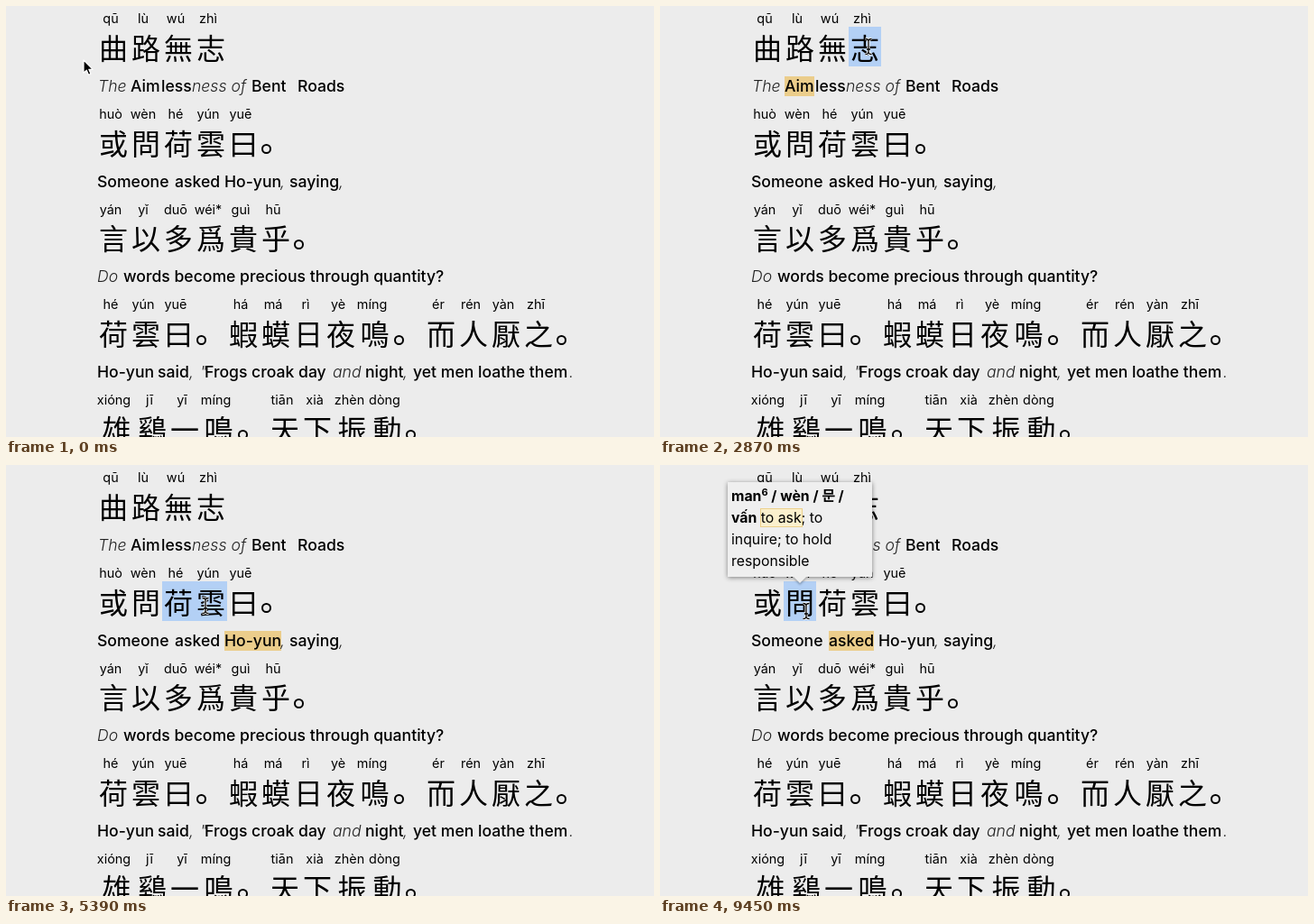
Recreate the animation shown at these times as an HTML page. Size 718 by 478 pixels, loop 9.66 s.

```html
<!DOCTYPE html>
<html lang="zh-Hant">
<head>
<meta charset="utf-8">
<style>
  html, body { margin: 0; width: 100%; height: 100%; overflow: hidden; background: #ececec; }
  body { position: relative; font-family: Inter, sans-serif; color: #000; cursor: default; }
  #page *, #tip, #pointer { position: absolute; white-space: nowrap; }
  .hanzi { height: 44px; font: 32px/44px "Noto Sans CJK TC", "Noto Sans CJK SC", sans-serif; text-align: center; }
  .pinyin { font-size: 14.4px; line-height: 18px; transform: translateX(-50%); }
  .stop { width: 7px; height: 7px; border: 2.6px solid #000; border-radius: 50%; }
  .word { font-size: 17.6px; font-weight: 500; line-height: 22px; }
  .light { font-weight: 300; font-style: italic; color: #222; }
  .hanzi.lit { background: #b3d0f5; }
  .word.lit { background: #ebcd8b; }
  #tip {
    left: 75px; top: 19px; width: 156px; height: 101px; padding: 4px 0 0 4px;
    background: #efefef; box-shadow: 0 1px 5px #0007; font-size: 15.8px; line-height: 24px;
  }
  #tip::after {
    content: ""; position: absolute; left: 73px; top: 105px;
    border: 7px solid transparent; border-top-color: #efefef; border-bottom: 0;
    filter: drop-shadow(0 2px 1px #0004);
  }
  #tip sup { font-size: 11px; line-height: 0; }
  #tip mark { color: inherit; background: #fbf0cd; outline: 1px solid #ecd08a; }
  #pointer { left: 0; top: 0; overflow: visible; }
</style>
</head>
<body>
<div id="page"></div>
<div id="tip"><b>man<sup>6</sup> / wèn / 문 /<br>vấn</b> <mark>to ask</mark>; to<br>inquire; to hold<br>responsible</div>
<svg id="pointer" width="1" height="1" stroke-linejoin="round">
  <path id="arrow" d="M0 0V14.2L3.3 11.2L5.5 16.4L8 15.3L5.8 10.3H10.2Z" stroke="#fff" stroke-width="1.2"/>
  <g id="beam" fill="none">
    <path d="M-3.5 -8.5Q0 -8.5 0 -6V6Q0 8.5 -3.5 8.5M3.5 -8.5Q0 -8.5 0 -6V6Q0 8.5 3.5 8.5M-2 3H2" stroke="#fff" stroke-width="3"/>
    <path d="M-3.5 -8.5Q0 -8.5 0 -6V6Q0 8.5 -3.5 8.5M3.5 -8.5Q0 -8.5 0 -6V6Q0 8.5 3.5 8.5M-2 3H2" stroke="#000" stroke-width="1.3"/>
  </g>
</svg>
<script>
const LOOP = 9660, TICK = 70, PITCH = 105.7;
const $ = id => document.getElementById(id);

const verses = [
  '曲qū 路lù 無wú 志zhì',
  '或huò 問wèn 荷hé 雲yún 曰yuē 。',
  '言yán 以yǐ 多duō 爲wéi* 貴guì 乎hū 。',
  '荷hé 雲yún 曰yuē 。 蝦há 蟆má 日rì 夜yè 鳴míng 。 而ér 人rén 厭yàn 之zhī 。',
  '雄xióng 鷄jī 一yī 鳴míng 。 天tiān 下xià 振zhèn 動dòng 。',
];
// Long syllables widen their column
const columnWidth = { míng: 39, xióng: 43, zhèn: 41, dòng: 37 };

// A leading ~ marks words without a counterpart in the verse
const lines = [
  [[102, '~The'], [138, 'Aim'], [172, 'less'], [206, '~ness of'], [272, 'Bent'], [323, 'Roads']],
  [[101, 'Someone'], [187, 'asked'], [242, 'Ho-yun'], [304, '~,'], [314, 'saying'], [369, '~,']],
  [[101, '~Do'], [130, 'words become precious through quantity?']],
  [[101, 'Ho-yun'], [168, 'said'], [203, '~,'], [215, '~"'], [220, 'Frogs croak day'], [362, '~and'],
   [398, 'night'], [440, '~,'], [451, 'yet men loathe them'], [624, '~.']],
];
const gloss = { 曲: 'Bent', 路: 'Roads', 無: 'less', 志: 'Aim',
                或: 'Someone', 問: 'asked', 荷: 'Ho-yun', 雲: 'Ho-yun', 曰: 'saying' };

function add(cls, x, y, text = '') {
  const el = document.createElement('div');
  el.className = cls;
  el.style.left = x + 'px';
  el.style.top = y + 'px';
  el.textContent = text;
  return $('page').appendChild(el);
}

const cells = [], words = [];
verses.forEach((verse, row) => {
  let x = 101;
  const y = row * PITCH;
  for (const item of verse.split(' ')) {
    const char = item[0], sound = item.slice(1), width = columnWidth[sound] || 36;
    if (char === '。') {
      add('stop', x + 2, y + 47.5);
    } else {
      const el = add('hanzi', x, y + 23, char);
      el.style.width = width + 'px';
      add('pinyin', x + width / 2 - 3, y + 5.3, sound);
      cells.push({ el, row, x, y: y + 23, width, link: gloss[char] });
    }
    x += width;
  }
});
lines.forEach((line, row) => line.forEach(([x, text]) => {
  const light = text[0] === '~', link = light ? text.slice(1) : text;
  words.push({ el: add(light ? 'word light' : 'word', x, row * PITCH + 77.8, link), row, link });
}));

// Pointer stops: time, x, y
const stops = [
  [0, 86, 60], [350, 124, 52], [630, 124, 52], [1120, 161, 55], [1260, 162, 54],
  [1470, 162, 54], [1960, 196, 52], [2030, 196, 52], [2170, 196, 50], [2310, 196, 50],
  [2870, 231, 45], [2940, 231, 45], [3080, 232, 45], [3150, 232, 45], [3500, 564, 3],
  [3850, 373, 167], [4130, 345, 165], [4200, 273, 158], [4270, 273, 158], [4340, 276, 158],
  [4760, 276, 158], [5110, 221, 156], [5670, 221, 156], [5810, 219, 157], [5880, 219, 157],
  [6720, 162, 162], [LOOP, 162, 162],
];

function pointerAt(t) {
  const i = stops.findIndex(s => s[0] > t);
  const [t0, x0, y0] = stops[i - 1], [t1, x1, y1] = stops[i];
  const u = (t - t0) / (t1 - t0), ease = u * u * (3 - 2 * u);
  return [x0 + (x1 - x0) * ease, y0 + (y1 - y0) * ease];
}

function draw(now) {
  const t = Math.floor(now % LOOP / TICK) * TICK;
  const [x, y] = pointerAt(t);
  const hit = cells.find(c => x >= c.x && x < c.x + c.width && y >= c.y && y < c.y + 44);
  for (const part of [...cells, ...words])
    part.el.classList.toggle('lit', !!hit && part.row === hit.row && part.link === hit.link);
  $('pointer').style.transform = `translate(${x}px, ${y}px)`;
  $('arrow').style.display = hit ? 'none' : '';
  $('beam').style.display = hit ? '' : 'none';
  $('tip').style.opacity = Math.min(1, Math.max(0, (t - 7280) / 350));
}

const start = performance.now();
function loop() {
  draw(performance.now() - start);
  requestAnimationFrame(loop);
}
loop();
</script>
</body>
</html>
```
